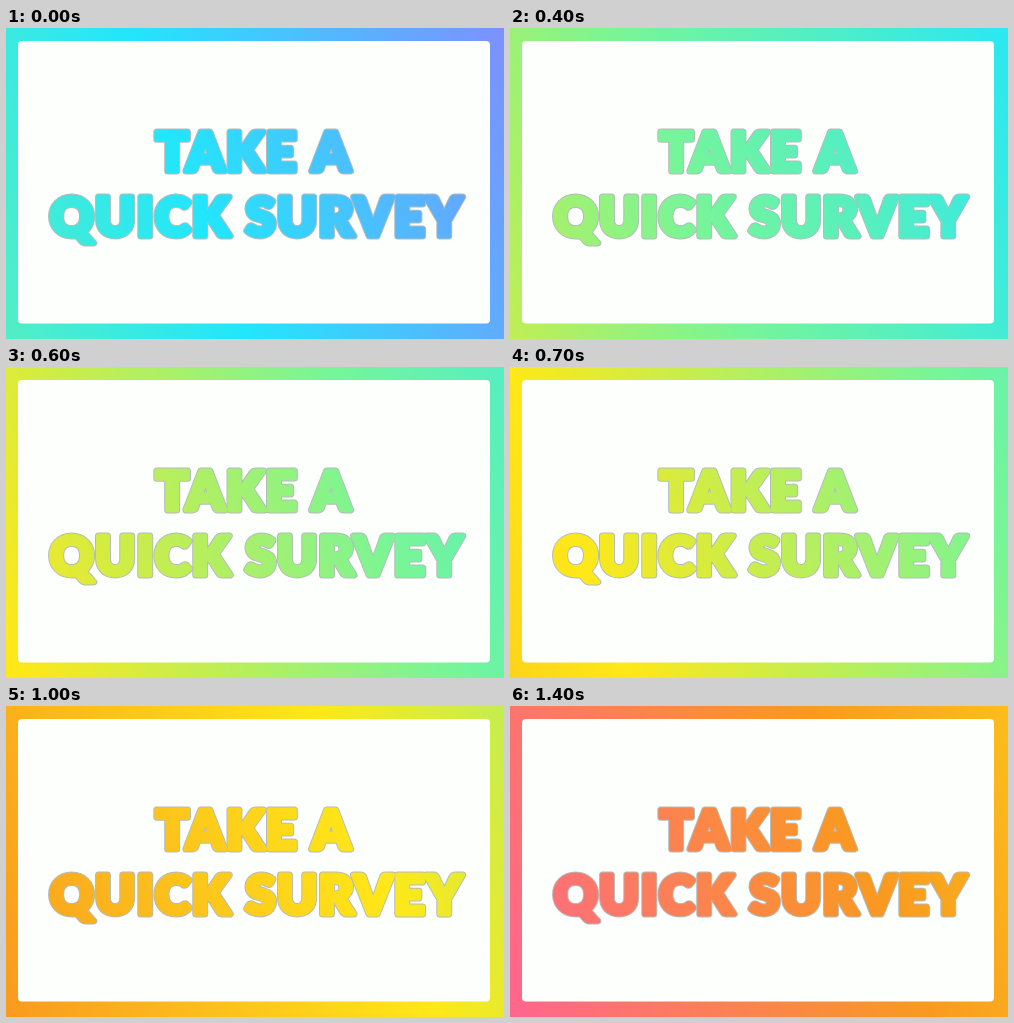
These frames come from a looping animation (498x311 px, 1.5 s). An HTML page with a canvas:

```html
<!DOCTYPE html>
<html lang="en">
<head>
<meta charset="utf-8">
<title>Take a quick survey</title>
<style>
  html, body { margin: 0; width: 100%; height: 100%; overflow: hidden; }
  canvas { display: block; }
</style>
</head>
<body>
<canvas id="stage" width="498" height="311"></canvas>
<script>
const ctx = document.getElementById('stage').getContext('2d');
const COLORS = ['#ff6490', '#f99a1f', '#ffe818', '#78f598', '#22e6fc', '#8a84ff'];
const LOOP = 1500, STEP = 100;
const SPEED = 105;              // pixels per step
const SLOPE = 0.39;             // tilt of the colour bands
const START = -1600, END = 550; // extent of the rainbow at time zero
const LINES = [['TAKE A', 150, 143], ['QUICK SURVEY', 44, 208]];

function rainbow(shift) {
  const scale = 1 / (1 + SLOPE * SLOPE);
  const a = (START + shift) * scale, b = (END + shift) * scale;
  const g = ctx.createLinearGradient(a, -a * SLOPE, b, -b * SLOPE);
  COLORS.forEach((c, i) => g.addColorStop(i / (COLORS.length - 1), c));
  return g;
}

function outline(color, width) {
  ctx.strokeStyle = color;
  ctx.lineWidth = width;
  for (const line of LINES) ctx.strokeText(...line);
}

function draw(now) {
  const paint = rainbow(Math.floor(now % LOOP / STEP) * SPEED);
  ctx.fillStyle = paint;
  ctx.fillRect(0, 0, 498, 311);

  ctx.fillStyle = '#fdfffd';
  ctx.beginPath();
  ctx.roundRect(12, 13, 472, 282.5, 4);
  ctx.fill();

  ctx.font = '900 53px Lato, sans-serif';
  ctx.letterSpacing = '2px';
  ctx.lineJoin = 'round';
  outline('#b4bcbc', 7);
  outline(paint, 5);
  ctx.fillStyle = paint;
  for (const line of LINES) ctx.fillText(...line);
  requestAnimationFrame(draw);
}
requestAnimationFrame(draw);
</script>
</body>
</html>
```
